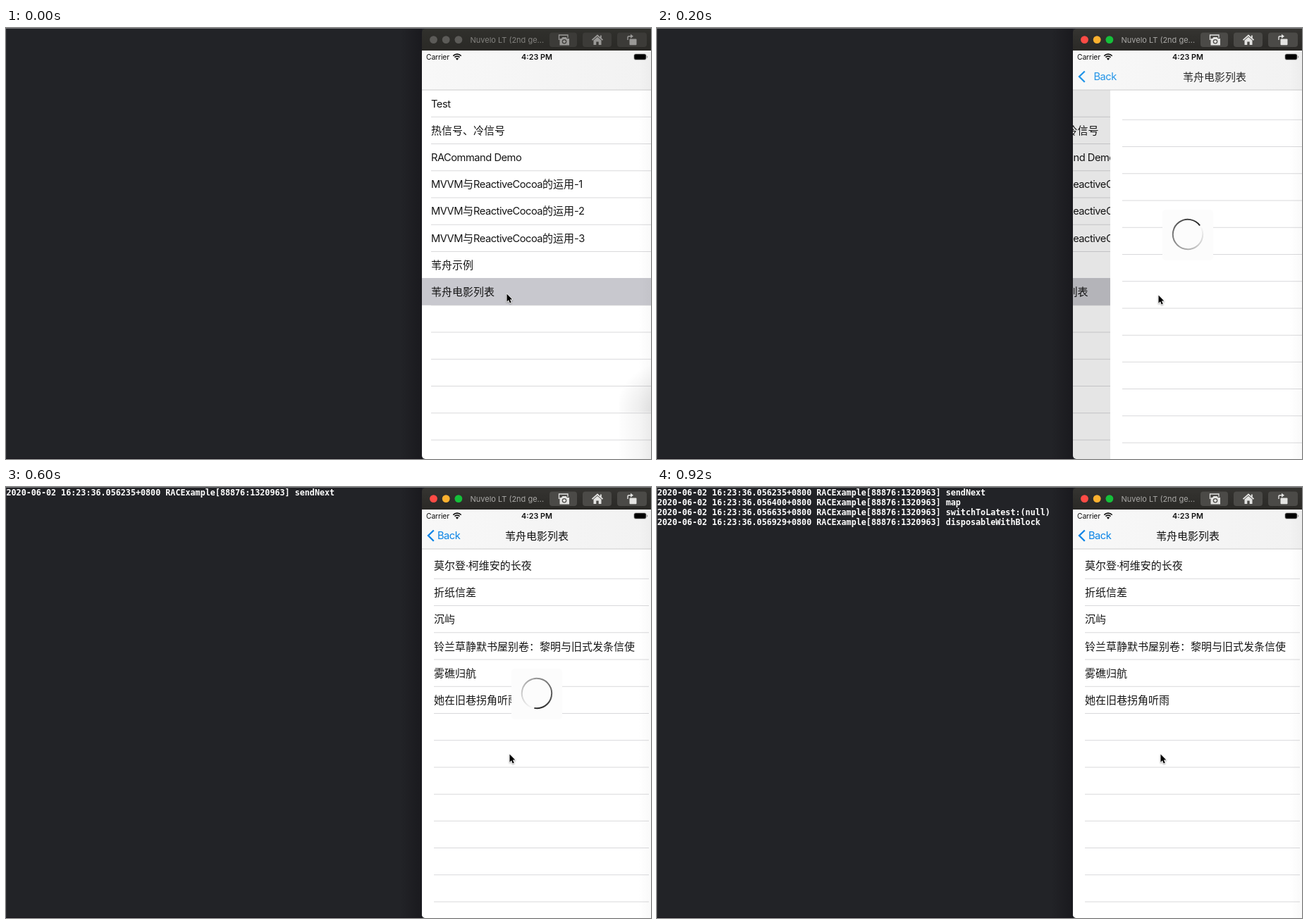
Animation of 915x612 px, one loop 1000 ms. Source, as an HTML page with a canvas:

```html
<!DOCTYPE html>
<html lang="zh-CN">
<head>
<meta charset="utf-8">
<title>List navigation</title>
<style>
html, body { margin: 0; height: 100%; overflow: hidden; background: #222327; }
canvas { display: block; }
</style>
</head>
<body>
<canvas id="stage" width="915" height="612"></canvas>
<script>
const c = document.getElementById('stage').getContext('2d');
const LEFT = 590, WIDTH = 325, ROW = 38.23, NAV = 88, STEP = 200;
const SLIDE = [1, 53 / WIDTH, 2.5 / WIDTH, 0, 0];
const CURSOR = [[710, 377], [711, 379], [714, 380], [714, 379], [714, 379]];
const MENU = ['Test', '热信号、冷信号', 'RACommand Demo', 'MVVM与ReactiveCocoa的运用-1',
  'MVVM与ReactiveCocoa的运用-2', 'MVVM与ReactiveCocoa的运用-3', '苇舟示例', '苇舟电影列表'];
const FILMS = ['莫尔登·柯维安的长夜', '折纸信差', '沉屿',
  '铃兰草静默书屋别卷：黎明与旧式发条信使', '雾礁归航', '她在旧巷拐角听雨'];
const LOG = [['056235', 'sendNext'], ['056400', 'map'],
  ['056635', 'switchToLatest:(null)'], ['056929', 'disposableWithBlock']];

function rect(x, y, w, h, fill, r = 0) {
  c.fillStyle = fill;
  c.beginPath();
  c.roundRect(x, y, w, h, r);
  c.fill();
}

function dot(x, y, r, fill) {
  c.fillStyle = fill;
  c.beginPath();
  c.arc(x, y, r, 0, 7);
  c.fill();
}

function path(d, fill, stroke, width = 1) {
  const p = new Path2D(d);
  if (stroke) {
    c.strokeStyle = stroke;
    c.lineWidth = width;
    c.stroke(p);
  }
  if (fill) {
    c.fillStyle = fill;
    c.fill(p);
  }
}

function text(s, x, y, font, fill, spacing = 0) {
  c.font = font;
  c.letterSpacing = spacing + 'px';
  c.fillStyle = fill;
  c.fillText(s, x, y);
  return c.measureText(s).width;
}

// Latin and Chinese runs have their own font and tracking.
function label(s, x, y, fill = '#161616', weight = 400) {
  for (const run of s.match(/[\x20-\xff]+|[^\x20-\xff]+/g))
    x += run.charCodeAt(0) < 256
      ? text(run, x, y, weight + ' 14.7px Inter, sans-serif', fill, -0.5)
      : text(run, x, y, weight + ' 15px "Noto Sans CJK SC", "Noto Sans CJK", sans-serif', fill);
}

function fade(x0, y0, x1, y1, from, to) {
  const g = c.createLinearGradient(x0, y0, x1, y1);
  g.addColorStop(0, from);
  g.addColorStop(1, to);
  return g;
}

function separators(x, first, end) {
  for (let y = first; y < 612; y += ROW) rect(x, y - 0.5, end - x, 1, '#d9d9db');
}

function menuPage(slide) {
  const shift = -0.3 * WIDTH * (1 - slide);
  rect(LEFT, NAV, WIDTH, 524, '#fff');
  c.save();
  c.translate(shift, 0);
  separators(603, NAV + ROW, 915);
  rect(LEFT, NAV + 7 * ROW - 0.5, WIDTH, ROW + 0.5, '#c8c8ce');
  MENU.forEach((s, i) => label(s, 603, NAV + ROW * i + 24.5));
  c.restore();
  rect(LEFT, NAV, WIDTH, 524, `rgba(0,0,0,${0.1 * Math.min(1, (1 - slide) * 1.2)})`);
}

function filmPage(slide, loaded) {
  const x = LEFT + slide * WIDTH;
  rect(x, NAV, WIDTH, 524, '#fff');
  separators(x + 17, 130.3, loaded ? 912 : 915);
  if (loaded) FILMS.forEach((s, i) => label(s, x + 17, 116.9 + ROW * i));
}

function spinner(step) {
  rect(717, 258, 72, 72, '#fcfcfc', 5);
  const head = (-35 + 68 * (step - 1)) * Math.PI / 180;
  const g = c.createConicGradient(head, 753, 293);
  g.addColorStop(0, 'rgba(30,30,30,0)');
  g.addColorStop(1, 'rgb(30,30,30)');
  c.strokeStyle = g;
  c.lineWidth = 2;
  c.beginPath();
  c.arc(753, 293, 21.2, head + 0.02, head + 2 * Math.PI - 0.02);
  c.stroke();
}

function navBar(step) {
  rect(LEFT, 32, WIDTH, NAV - 32, fade(LEFT, 0, 915, 0, '#f8f8f8', '#f2f2f2'));
  rect(LEFT, NAV - 0.5, WIDTH, 1, '#cbcbcc');
  text('Carrier', 596, 45.3, '10.4px Inter, sans-serif', '#111', -0.15);
  c.textAlign = 'center';
  text('4:23 PM', 753, 45.3, '600 10.8px Inter, sans-serif', '#111');
  c.textAlign = 'left';

  c.strokeStyle = '#111';
  c.lineWidth = 1.7;
  for (const r of [8, 5]) {
    c.beginPath();
    c.arc(640, 45.2, r, -2.36, -0.78);
    c.stroke();
  }
  path('M640 45.8L637.8 43.2Q640 41.6 642.2 43.2Z', '#111');
  rect(890.5, 36.5, 18, 9, '#aaa', 2.8);
  rect(891.3, 37.3, 16.4, 7.4, '#000', 2);
  rect(909, 39.5, 1.2, 3, '#999', 0.6);

  if (!step) return;
  const moving = step === 1;
  const blue = moving ? '#2395e8' : '#0a84e6';
  path('M606.8 61.5L599 69L606.8 76.8', null, blue, 2.3);
  label('Back', moving ? 619.5 : 612, 74.3, blue);
  label('苇舟电影列表', moving ? 746 : 708, 74.6, moving ? '#2b2b2b' : '#111', moving ? 400 : 500);
}

function titleBar(active) {
  rect(LEFT, 1, WIDTH, 31, fade(0, 1, 0, 32, active ? '#353431' : '#30302c', '#2a2926'), [5, 0, 0, 0]);
  const lights = active ? ['#fe4b45', '#fdb12f', '#15c03a'] : Array(3).fill('#5c5b58');
  lights.forEach((fill, i) => dot(606.5 + 17.7 * i, 16.6, 5.4, fill));
  text('Nuvelo LT (2nd ge...', 658.5, 20.8, '11px Inter, sans-serif', active ? '#a9a8a6' : '#83827f');

  const face = active ? '#4b4a47' : '#3c3b38', ink = active ? '#e4e4e2' : '#9a9997';
  for (const [x, w] of [[771, 39], [818, 41], [867, 42]]) rect(x, 6.5, w, 20.5, face, 4);
  // Camera
  path('M784.5 17V10H797V14', null, ink, 1.3);
  path('M785.5 15H788L789.5 13H794.5L796 15H799V24.5H785.5Z', ink);
  dot(792, 19.3, 3.3, face);
  dot(792, 19.3, 2, ink);
  // Home
  path('M831.5 17.2L839 10.5L846.5 17.2', null, ink, 1.7);
  path('M833.5 17.5L839 12.8L844.5 17.5V24H840.7V19.5H837.3V24H833.5Z', ink);
  rect(843, 10.5, 1.8, 4, ink);
  // Rotate
  rect(884.5, 15.5, 10, 8.8, ink, 1);
  path('M882 17V13.5Q882 11.8 884 11.8H887', null, ink, 1.4);
  path('M886 8.8L890 11.8L886 14.8Z', ink);
}

function pointer([x, y]) {
  c.save();
  c.translate(x, y);
  c.lineJoin = 'round';
  c.shadowColor = 'rgba(0,0,0,.35)';
  c.shadowBlur = 2;
  c.shadowOffsetY = 1;
  const arrow = 'M.5 .5V11.7L3 9.3L4.8 13.5L6.7 12.7L4.9 8.6H8.3Z';
  path(arrow, null, '#fff', 1.6);
  c.shadowColor = 'transparent';
  path(arrow, '#000');
  c.restore();
}

function desktop(lines) {
  rect(0, 0, 915, 612, '#222327');
  rect(560, 0, 30, 612, fade(560, 0, 590, 0, 'rgba(20,19,24,0)', 'rgba(20,19,24,.6)'));
  rect(0, 0, 1, 612, '#2b2a30');
  rect(0, 611, 590, 1, '#18151c');
  rect(0, 0, 915, 1, '#77787b');
  LOG.slice(0, lines).forEach(([micros, message], i) =>
    text(`2020-06-02 16:23:36.${micros}+0800 RACExample[88876:1320963] ${message}`,
      0.5, 11.5 + 14 * i, 'bold 11.73px "DejaVu Sans Mono", monospace', '#fff'));
}

function edgeShade(step) {
  rect(897, 32, 18, 580, fade(897, 0, 915, 0, 'rgba(0,0,0,0)', 'rgba(0,0,0,.025)'));
  if (step) return;
  const g = c.createRadialGradient(935, 545, 20, 935, 545, 70);
  g.addColorStop(0, 'rgba(0,0,0,.1)');
  g.addColorStop(1, 'rgba(0,0,0,0)');
  rect(870, 470, 45, 75, g);
  rect(870, 545, 45, 67, fade(865, 0, 915, 0, 'rgba(0,0,0,0)', 'rgba(0,0,0,.06)'));
}

function draw(step) {
  desktop([0, 0, 0, 1, 4][step]);
  c.save();
  c.beginPath();
  c.roundRect(LEFT, 1, WIDTH, 611, [5, 0, 0, 5]);
  c.clip();
  menuPage(SLIDE[step]);
  if (step) filmPage(SLIDE[step], step > 2);
  if (step > 0 && step < 4) spinner(step);
  navBar(step);
  edgeShade(step);
  titleBar(step > 0);
  pointer(CURSOR[step]);
  c.restore();
}

function tick(now) {
  draw(Math.floor(now % (5 * STEP) / STEP));
  requestAnimationFrame(tick);
}
tick(performance.now());
</script>
</body>
</html>
```
